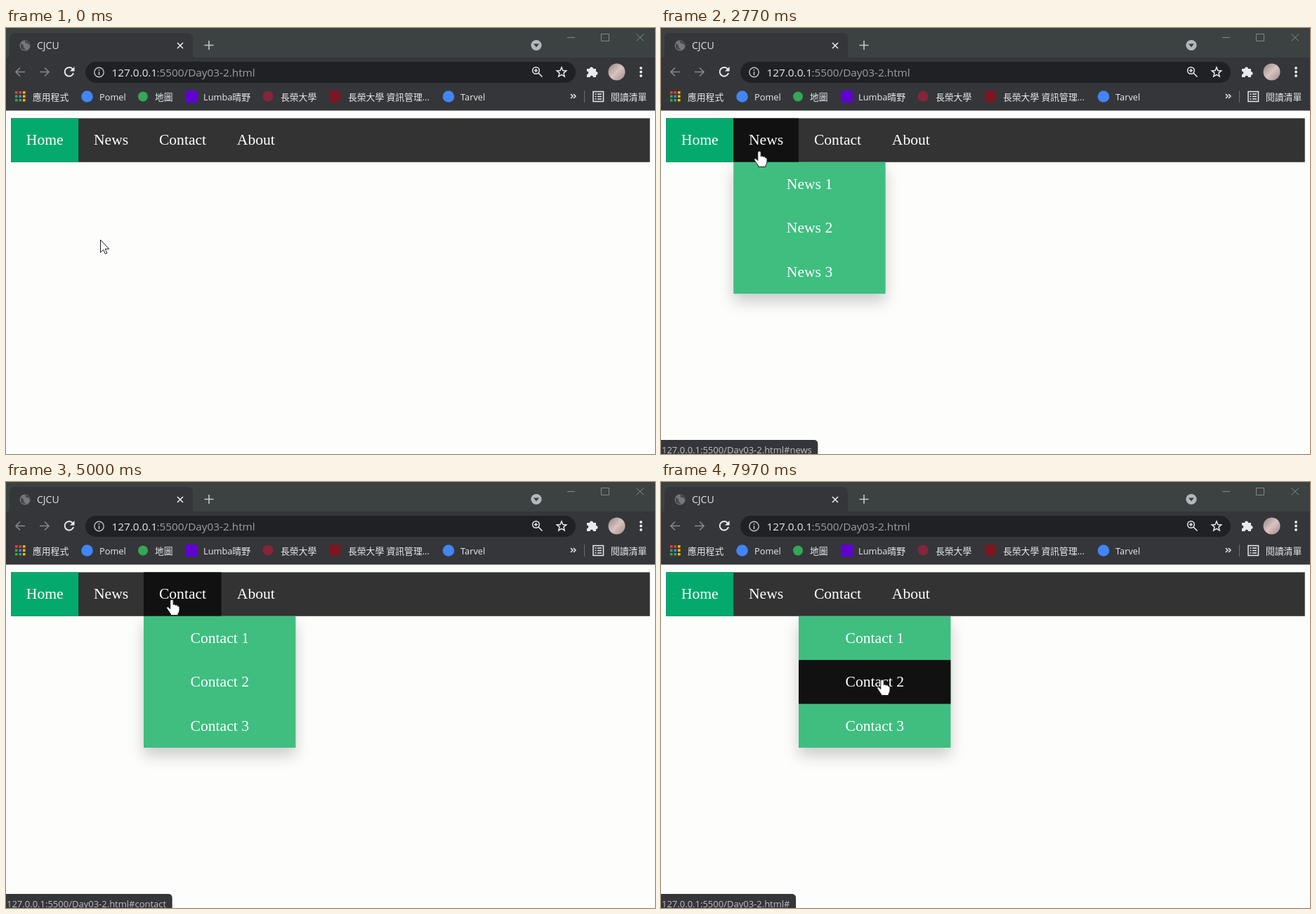
Animation, 924 px wide and 606 px high, one loop 8 s. Source, as an HTML page:

```html
<!DOCTYPE html>
<html lang="zh-Hant">
<head>
<meta charset="utf-8">
<title>CJCU</title>
<style>
  html, body { margin: 0; width: 100%; height: 100%; overflow: hidden; background: #fdfdfc; }
  svg { display: block; width: 924px; height: 606px; }
  .ui { font-family: "Open Sans", "Noto Sans CJK TC", "Noto Sans CJK JP", "Noto Sans CJK", sans-serif; fill: #e8eaed; }
  .marks { font-size: 12.8px; }
  .page { font: 21.6px "Liberation Serif", "Times New Roman", serif; fill: #fff; }
  .line { fill: none; stroke: #e8eaed; stroke-width: 1.6; }
  .dim { stroke: #85898c; }
  .mid { text-anchor: middle; }
</style>
</head>
<body>
<svg viewBox="0 0 924 606">
  <defs>
    <linearGradient id="photo" x2="1" y2="1">
      <stop stop-color="#8d8583"/><stop offset=".5" stop-color="#d9c3c1"/><stop offset="1" stop-color="#a08c8a"/>
    </linearGradient>
    <filter id="blur" x="-30%" y="-30%" width="160%" height="160%"><feGaussianBlur stdDeviation="10.8"/></filter>
  </defs>
  <rect width="924" height="606" fill="#fdfdfc"/>

  <g class="ui">
    <rect width="924" height="43" fill="#3c4142"/>
    <path d="M0 43Q5 43 5 37V15Q5 7 13 7H258Q266 7 266 15V37Q266 43 272 43Z" fill="#35363a"/>
    <rect y="42" width="924" height="75.500" fill="#35363a"/>
    <rect x="113" y="48" width="698" height="30" rx="15" fill="#202124"/>

    <circle cx="27" cy="25" r="7.500" fill="#75787b"/>
    <path d="M21 22Q25 23 25 26T29 31Q24 32 21 28ZM27 18Q27 22 30 22T33 26Q35 22 31 19Z" fill="#45474b"/>
    <text x="44" y="30" font-size="14" fill="#dfe1e5">CJCU</text>
    <path class="line" d="M244 21l8 8m0-8l-8 8"/>
    <path class="line" style="stroke:#c5c8cb" d="M282.500 24.500h13m-6.500-6.500v13"/>
    <circle cx="755" cy="24.500" r="7.600" fill="#b4b8bc"/>
    <path d="M751 22.500h8l-4 5z" fill="#3c4142"/>
    <path class="line dim" style="stroke-width:1" d="M799 13.500h11M847.500 8.500h11v10h-11zM897.500 8.500l10.500 10m0-10l-10.500 10"/>

    <path class="line dim" d="M27 62.500H14m6-6l-6 6 6 6M48 62.500h13m-6-6l6 6-6 6"/>
    <path class="line" style="stroke-width:2" d="M95 58.500A6.300 6.300 0 1 0 96 64"/>
    <path d="M97.500 55v6.500H91z"/>
    <circle class="line" cx="132.500" cy="63" r="6.700" style="stroke:#bdc1c6;stroke-width:1.400"/>
    <path class="line" style="stroke:#bdc1c6" d="M132.500 59v1.800m0 1.400v4.800"/>
    <text y="69" font-size="15.300"><tspan x="150.500">127.0.0.1</tspan><tspan x="214.500" fill="#9aa0a6">:5500/Day03-2.html</tspan></text>
    <g class="line" style="stroke-width:1.500">
      <circle cx="754.500" cy="60.500" r="4.800"/>
      <path d="M758 64l5.500 5.500M752 60.500h5m-2.500-2.500v5"/>
      <path d="M791 56l1.900 4.500 4.800.4-3.700 3.200 1.200 4.800-4.200-2.600-4.200 2.600 1.200-4.800-3.700-3.200 4.800-.4z"/>
    </g>
    <path d="M827 58h4a2.500 2.500 0 0 1 5 0h4v4a2.500 2.500 0 0 1 0 5v3h-4a2.200 2.200 0 0 0-4.500 0h-4.500v-4a2.200 2.200 0 0 0 0-4.500z"/>
    <circle cx="869.500" cy="62.500" r="12" fill="url(#photo)"/>
    <circle cx="904" cy="57" r="1.900"/><circle cx="904" cy="62.500" r="1.900"/><circle cx="904" cy="68" r="1.900"/>

    <g id="apps"></g>
    <circle cx="115.500" cy="97.500" r="8.300" fill="#4285f4"/>
    <circle cx="195" cy="97.500" r="7" fill="#34a853"/>
    <rect x="256" y="89" width="17" height="17" fill="#5f01d1"/>
    <circle cx="373" cy="97" r="7.500" fill="#85253a"/>
    <rect x="461" y="89" width="15" height="16" fill="#7b1622"/>
    <circle cx="630" cy="97.500" r="8.300" fill="#4285f4"/>
    <g class="marks">
      <text x="38" y="102.500">應用程式</text>
      <text x="133" y="102.500">Pomel</text>
      <text x="212" y="102.500">地圖</text>
      <text x="281" y="102.500">Lumba晴野</text>
      <text x="391" y="102.500">長榮大學</text>
      <text x="487" y="102.500">長榮大學 資訊管理...</text>
      <text x="647" y="102.500">Tarvel</text>
      <text x="861" y="102.500">閱讀清單</text>
    </g>
    <path class="line" style="stroke-width:1.500" d="M804 94l3 3-3 3m4-6l3 3-3 3M836 90.500h14.500v14H836z"/>
    <path class="line" style="stroke-width:1.500" d="M838.500 94h2m1.500 0h6m-9.500 3.500h2m1.500 0h6m-9.500 3.500h2m1.500 0h6"/>
    <path d="M823.500 89v17" stroke="#6a6d71"/>
  </g>

  <g class="page">
    <rect x="7.200" y="128.400" width="909.500" height="62.400" fill="#333"/>
    <rect x="7.200" y="128.400" width="96" height="62.400" fill="#04aa6d"/>
    <rect id="tab" y="128.400" height="62.400" fill="#111"/>
    <text x="28.800" y="166.400">Home</text>
    <text x="125" y="166.400">News</text>
    <text x="217.900" y="166.400">Contact</text>
    <text x="328.800" y="166.400">About</text>
    <g id="drop">
      <rect y="201.600" width="216.400" height="187.200" fill-opacity=".2" fill="#000" filter="url(#blur)"/>
      <rect y="190.800" width="216.400" height="187.200" fill="#3fbe80"/>
      <rect id="row" width="216.400" height="62.400" fill="#111"/>
      <text class="mid" x="108.300" y="228.800"></text>
      <text class="mid" x="108.300" y="291.200"></text>
      <text class="mid" x="108.300" y="353.600"></text>
    </g>
  </g>

  <g id="status" class="ui">
    <path id="bubble" fill="#35363a" stroke="#2f3033"/>
    <text id="link" x="1" y="604.500" font-size="13" fill="#bdc1c6"></text>
  </g>

  <g id="cursor" fill="#fff" stroke="#1b1b24" stroke-linejoin="round">
    <path id="arrow" d="M.5.500V18.300L4.600 14.400 7.300 20.300 9.800 19.200 7.200 13.300H12.700Z"/>
    <path id="hand" d="M-2.200 2Q-2 0 0 0T2.200 2V7.500Q4.500 5.800 5.300 8.200 8 6.800 8.500 9.500 11 9 11 11.500V15Q11 18 9 20.500V22.500H-1.500V21Q-3 19-4.500 16.500L-7.200 12.500Q-7.500 9.800-4.800 10.800L-2.200 13.500Z"/>
  </g>
</svg>
<script>
const LOOP = 8000, STEP = 100 / 3;
const BAR = 128.4, ROW = 62.4, TOP = BAR + ROW, DROP = 216.4;
const $ = id => document.getElementById(id);
const set = (el, attrs) => { for (const k in attrs) el.setAttribute(k, attrs[k]); };
const show = (el, on) => { el.style.display = on ? '' : 'none'; };

// time, x, y of the pointer tip
const path = [
  [0, 134, 301], [30, 134, 301], [130, 66, 193], [330, 66, 193], [950, 63, 192],
  [1150, 60, 169], [1800, 61, 171], [2350, 112, 175], [2770, 140, 175], [2900, 146, 178],
  [3450, 185, 345], [3700, 188, 342], [4400, 199, 196], [4600, 206, 180], [5300, 255, 158],
  [5870, 261, 153], [6050, 268, 165], [6900, 303, 350], [7030, 306, 352], [7350, 309, 352],
  [7970, 315, 281]
];
const menus = [
  { name: 'News', x: 103.2, w: 92.6, from: 2000, to: 4500 },
  { name: 'Contact', x: 196, w: 110.6, from: 4500, to: LOOP }
];
const labels = $('drop').querySelectorAll('text');

function pointer(t) {
  let i = 1;
  while (i < path.length - 1 && t > path[i][0]) i++;
  const [t0, x0, y0] = path[i - 1], [t1, x1, y1] = path[i];
  const p = Math.min(1, (t - t0) / (t1 - t0)), e = p * p * (3 - 2 * p);
  return [x0 + (x1 - x0) * e, y0 + (y1 - y0) * e];
}

function drawStatus(hash, alpha) {
  show($('status'), alpha > 0);
  $('status').style.opacity = alpha;
  $('link').textContent = '127.0.0.1:5500/Day03-2.html#' + hash;
  const w = $('link').getComputedTextLength() + 9;
  set($('bubble'), { d: `M-1 607V586.5H${w - 5}Q${w} 586.5 ${w} 591.5V607Z` });
}

function draw(t) {
  const [x, y] = pointer(t);
  const menu = menus.find(m => t >= m.from && t < m.to);
  const inBar = y >= BAR && y < TOP;
  const onTab = !!menu && inBar && x >= menu.x && x < menu.x + menu.w;
  const row = Math.floor((y - TOP) / ROW);
  const onRow = !!menu && x >= menu.x && x < menu.x + DROP && row >= 0 && row < 3;
  const onHome = inBar && x < menus[0].x;

  show($('tab'), onTab);
  show($('drop'), onTab || onRow);
  show($('row'), onRow);
  if (menu) {
    set($('tab'), { x: menu.x, width: menu.w });
    set($('drop'), { transform: `translate(${menu.x})` });
    labels.forEach((el, i) => { el.textContent = `${menu.name} ${i + 1}`; });
  }
  if (onRow) set($('row'), { y: TOP + row * ROW });

  const hash = onHome ? 'home' : onTab ? menu.name.toLowerCase() : '';
  const linked = onHome || onTab || onRow;
  drawStatus(hash, linked ? Math.max(0, Math.min(1, (t - 1330) / 250)) : 0);

  show($('hand'), linked);
  show($('arrow'), !linked);
  set($('cursor'), { transform: `translate(${Math.round(x)} ${Math.round(y)})` });
}

const tints = ['#ea4335', '#ea4335', '#fbbc04', '#34a853', '#4285f4', '#fbbc04', '#34a853', '#34a853', '#fbbc04'];
$('apps').innerHTML = tints.map((c, i) =>
  `<rect x="${13 + i % 3 * 5.5}" y="${90 + Math.floor(i / 3) * 5.5}" width="3.5" height="3.5" fill="${c}"/>`).join('');

const start = performance.now();
function tick() {
  const t = (performance.now() - start) % LOOP;
  draw(Math.floor((t + 4) / STEP) * STEP);
  requestAnimationFrame(tick);
}
tick();
</script>
</body>
</html>
```
